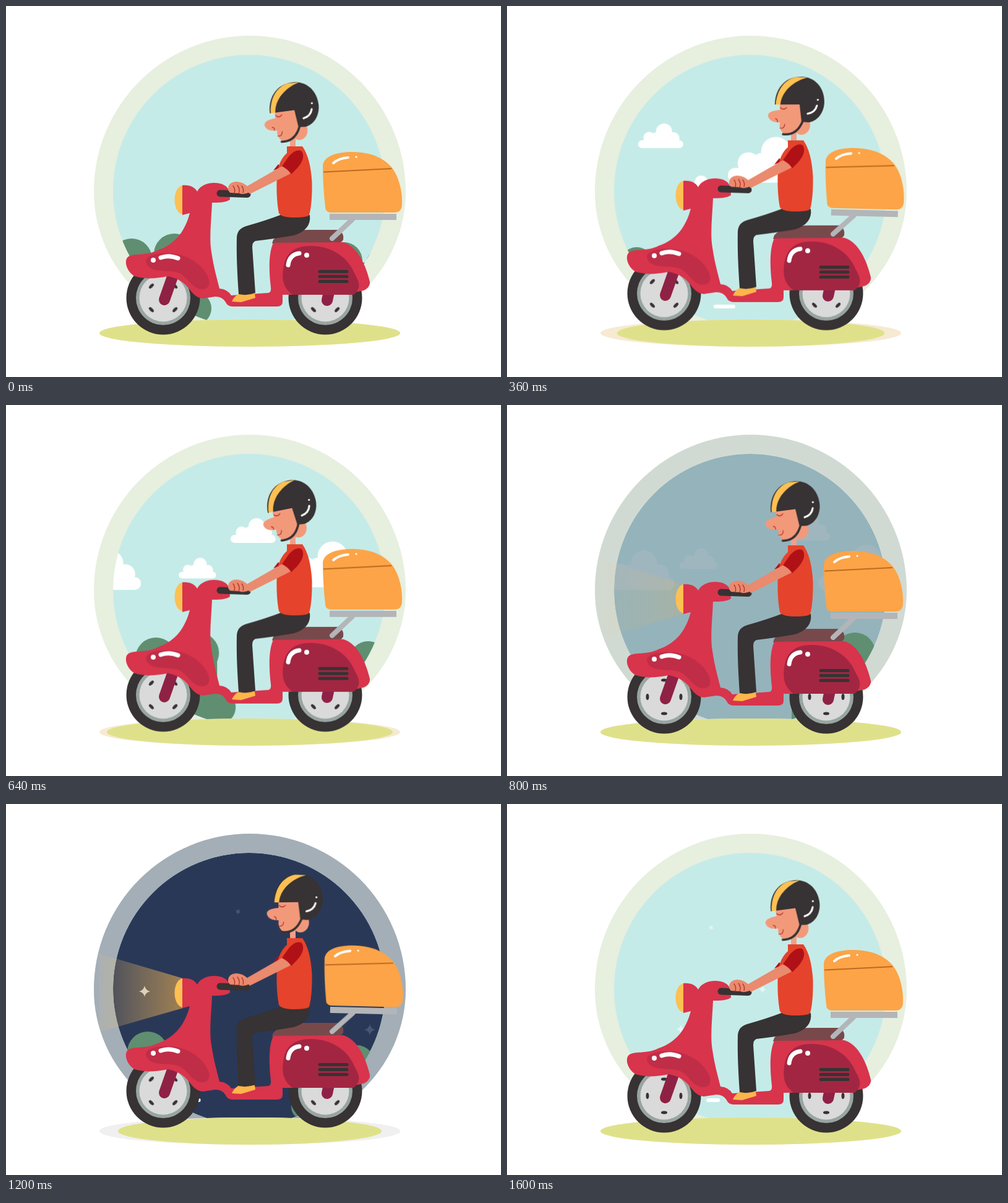
An HTML page without scripts that plays this animation: 800 by 600 pixels, repeating every 1640 ms.

```html
<!DOCTYPE html>
<html lang="en">
<head>
<meta charset="utf-8">
<title>Scooter delivery</title>
<style>
  html, body { margin: 0; width: 100%; height: 100%; overflow: hidden; background: #fff; }
  svg { display: block; width: 100vw; height: 100vh; }
  .anim { animation: 1640ms linear infinite; }

  /* Stepped parts start slightly early so no step lands on a rounding edge */
  .bounce, .ground, .spin, .bushes { animation-delay: -10ms; }

  /* The ride bounces every 800 ms, twice per loop */
  .bounce { animation-name: bounce; animation-timing-function: steps(10); }
  .ground { animation-name: squeeze; animation-timing-function: steps(10); transform-origin: 394px 529px; }
  .rider { animation-name: lift; }
  .head { animation-name: nod; transform-origin: 465px 222px; }
  .cargo { animation-name: tilt; transform-origin: 527px 376px; }
  .spin { animation-name: spin; animation-timing-function: steps(41); }
  @keyframes bounce {
    0%, 48.78%, 97.56%, 100% { transform: translateY(0); }
    24.39%, 73.17% { transform: translateY(-8px); }
  }
  @keyframes squeeze {
    0%, 48.78%, 97.56%, 100% { transform: scaleX(1); }
    24.39%, 73.17% { transform: scaleX(.877); }
  }
  @keyframes lift {
    0%, 48.78%, 97.56%, 100% { transform: translateY(0); }
    9.76%, 58.54% { transform: translateY(-2.8px); }
    17.07%, 65.85% { transform: translateY(-3.2px); }
    24.39%, 73.17% { transform: translateY(-2.2px); }
    39.02%, 87.8% { transform: translateY(1.4px); }
  }
  @keyframes nod {
    0%, 48.78%, 97.56%, 100% { transform: rotate(-7.5deg); }
    9.76%, 58.54% { transform: rotate(-.8deg); }
    17.07%, 65.85% { transform: rotate(1deg); }
    24.39%, 73.17% { transform: rotate(-.7deg); }
    39.02%, 87.8% { transform: rotate(-11.5deg); }
  }
  @keyframes tilt {
    0%, 39.02%, 48.78%, 87.8%, 97.56%, 100% { transform: rotate(0); }
    9.76%, 24.39%, 58.54%, 73.17% { transform: rotate(1.4deg); }
  }
  @keyframes spin { to { transform: rotate(-1845deg); } }

  .night { animation-name: night; }
  @keyframes night {
    0%, 44%, 95.5%, 100% { opacity: 0; }
    59.5%, 84.5% { opacity: 1; }
  }

  .clouds { animation-name: clouds; }
  @keyframes clouds {
    0%, 2% { opacity: 0; }
    15%, 41% { opacity: 1; }
    52%, 100% { opacity: 0; }
  }
  .drift { animation-name: drift; }
  @keyframes drift {
    from { transform: translate(var(--from)); }
    to { transform: translate(var(--to)); }
  }

  .bushes { animation-name: bushes; }
  @keyframes bushes {
    0% { transform: translateX(0); animation-timing-function: steps(7); }
    17.07% { transform: translateX(440px); animation-timing-function: step-end; }
    17.073% { transform: translateX(-526px); animation-timing-function: steps(15); }
    53.65% { transform: translateX(416px); animation-timing-function: step-end; }
    53.658% { transform: translateX(-541px); animation-timing-function: steps(16); }
    92.68%, 100% { transform: translateX(455px); }
  }

  .dash-low { animation-name: dashLow; }
  .dash-high { animation-name: dashHigh; }
  @keyframes dashLow {
    0%, 14.63% { transform: translateX(231px); }
    43.9% { transform: translateX(639px); }
    43.91%, 51.22% { transform: translateX(247px); }
    70.73% { transform: translateX(519px); }
    70.74%, 82.93% { transform: translateX(254px); }
    97.56%, 100% { transform: translateX(458px); }
  }
  @keyframes dashHigh {
    0%, 70.73% { transform: translateX(231px); }
    73.17% { transform: translateX(291px); }
    82.93% { transform: translateX(531px); }
    82.94%, 92.68% { transform: translateX(231px); }
    97.56% { transform: translateX(321px); }
    100% { transform: translateX(365px); }
  }

  .stars use { opacity: 0; animation: twinkle 1640ms linear infinite; animation-delay: calc((var(--peak) - 1710) * 1ms); }
  @keyframes twinkle {
    0%, 8.6%, 100% { opacity: 0; }
    4.3% { opacity: 1; }
  }

  .red { fill: #d8344c; }
  .maroon { fill: #a22642; }
  .dark { fill: #373233; }
  .skin { fill: #ea8a6e; }
  .face { fill: #f2997a; }
  .yellow { fill: #fdb64a; }
  .light { fill: #fdc052; }
  .grey { fill: #b3b5b8; }
  .shine { fill: none; stroke: #fff; stroke-linecap: round; }
  .ink { fill: none; stroke: #b5322c; stroke-width: 1.3; stroke-linecap: round; }
</style>
</head>
<body>
<svg viewBox="0 0 800 600" preserveAspectRatio="none">
  <defs>
    <path id="disc" d="M142 300A252 252 0 0 1 646 300A252 235 0 0 1 142 300Z"/>
    <clipPath id="skyClip"><circle cx="393" cy="299" r="220"/></clipPath>
    <clipPath id="discClip"><use href="#disc"/></clipPath>
    <linearGradient id="beam">
      <stop offset="0" stop-color="#f6c682" stop-opacity=".1"/>
      <stop offset=".25" stop-color="#f6c268" stop-opacity=".23"/>
      <stop offset="1" stop-color="#f2b04c" stop-opacity=".6"/>
    </linearGradient>
    <g id="cloud" fill="#fff">
      <rect y="27" width="73" height="13" rx="6.5"/>
      <path d="M18 22H57V34H18Z"/>
      <circle cx="18" cy="23" r="9.5"/><circle cx="30" cy="24" r="10"/>
      <circle cx="42" cy="13" r="13"/><circle cx="57" cy="24" r="10"/>
    </g>
    <path id="star" d="M0-9Q1.5-1.5 9 0Q1.5 1.5 0 9Q-1.5 1.5-9 0Q-1.5-1.5 0-9Z"/>
    <g id="holes" class="dark">
      <ellipse cx="-27" rx="2.5" ry="5"/><ellipse cx="27" rx="2.5" ry="5"/>
      <ellipse cy="-27" rx="5" ry="2.5"/><ellipse cy="27" rx="5" ry="2.5"/>
    </g>
    <g id="wheel">
      <circle r="59.5" class="dark"/>
      <circle r="44" fill="#98a5a1"/>
      <circle r="38.5" fill="#dadada"/>
      <g class="anim spin"><use href="#holes"/></g>
    </g>
  </defs>

  <!-- Backdrop -->
  <use href="#disc" fill="#e7efdf"/>
  <use href="#disc" class="anim night" fill="#a3aeb7"/>
  <circle cx="393" cy="299" r="220" fill="#c5ebe8"/>
  <g clip-path="url(#skyClip)">
    <g class="anim clouds">
      <g class="anim drift" style="--from:17px,199px;--to:902px,158px"><use href="#cloud"/></g>
      <g class="anim drift" style="--from:237px,200px;--to:782px,253px"><use href="#cloud" transform="scale(1.85)"/></g>
      <g class="anim drift" style="--from:279px,309px;--to:279px,151px"><use href="#cloud" transform="scale(.83)"/></g>
      <g class="anim drift" style="--from:-110px,235px;--to:431px,235px"><use href="#cloud" transform="scale(1.6)"/></g>
    </g>
    <circle class="anim night" cx="393" cy="299" r="220" fill="#2a3858"/>
    <g class="anim bushes" fill="#5f8f70">
      <circle cx="203" cy="409" r="33"/><circle cx="272" cy="401" r="33"/>
      <path d="M170 409H302V508H170Z"/><circle cx="305" cy="489" r="27"/>
      <circle cx="546" cy="412" r="30"/><circle cx="610" cy="418" r="28"/>
      <path d="M525 415H634V508H525Z"/><circle cx="525" cy="490" r="21"/>
    </g>
  </g>
  <ellipse cx="394" cy="529" rx="243" ry="22" fill="#f6ead2"/>
  <ellipse class="anim night" cx="394" cy="529" rx="243" ry="22" fill="#f0f0f0"/>
  <ellipse class="anim ground" cx="394" cy="529" rx="243" ry="22" fill="#dfe18a"/>
  <rect class="anim dash-low" y="483" width="35" height="6" rx="3" fill="#fff"/>
  <rect class="anim dash-high" y="476" width="22" height="6" rx="3" fill="#fff"/>

  <g clip-path="url(#discClip)">
    <g class="anim night"><path class="anim bounce" d="M286 290L150 250V377L286 338Z" fill="url(#beam)"/></g>
  </g>

  <g class="stars" fill="#d5e2e6">
    <use href="#star" transform="translate(393 174) rotate(30) scale(.6)" style="--peak:960"/>
    <use href="#star" transform="translate(258 295) rotate(25) scale(.8)" fill="#e6d9b8" style="--peak:960"/>
    <use href="#star" transform="translate(193 366)" style="--peak:960"/>
    <use href="#star" transform="translate(224 303)" fill="#dfd3b5" style="--peak:1200"/>
    <use href="#star" transform="translate(563 174) rotate(30) scale(.55)" style="--peak:1440"/>
    <g fill-opacity=".18">
      <use href="#star" transform="translate(375 174) rotate(30) scale(.55)" style="--peak:1200"/>
      <use href="#star" transform="translate(588 365)" style="--peak:1200"/>
      <use href="#star" transform="translate(356 174) scale(.45)" style="--peak:1440"/>
      <use href="#star" transform="translate(204 200) scale(.45)" style="--peak:1440"/>
      <use href="#star" transform="translate(413 303)" style="--peak:1440"/>
      <use href="#star" transform="translate(364 366)" style="--peak:1440"/>
      <use href="#star" transform="translate(570 366)" style="--peak:1440"/>
    </g>
    <g fill="#fff">
      <use href="#star" transform="translate(330 200) rotate(30) scale(.5)" style="--peak:1569"/>
      <use href="#star" transform="translate(413 300) scale(.7)" style="--peak:1569"/>
      <use href="#star" transform="translate(281 364) scale(.8)" style="--peak:1569"/>
    </g>
  </g>

  <g class="anim bounce">
    <!-- Scooter -->
    <use href="#wheel" x="254" y="472"/>
    <use href="#wheel" x="516" y="472"/>
    <path d="M269 438L256 475M522 462L519 476" fill="none" stroke="#8f2145" stroke-width="18" stroke-linecap="round"/>
    <path d="M430 384L432 378Q445 362 490 362L538 362Q547 368 545 378Q542 384 532 384Z" fill="#78494b"/>
    <path class="light" d="M286 290C268 292 268 335 286 337Z"/>
    <path class="red" d="M285 290C297 289 305 293 309 300C314 290 326 286 336 286C350 286 358 291 361 300L362 313C355 318 343 318 333 318C332 345 328 375 332 398C336 425 341 440 345 457Q358 458 364 468L424 464Q429 463 428 455C425 430 424 400 432 383L545 382C568 388 582 420 588 446Q589 455 578 460L545 467H447V478Q447 486 438 486H366Q358 486 355 479Q350 470 338 470L318 473C295 470 300 445 262 437C240 441 225 442 208 437C195 430 190 412 197 406C205 399 225 405 245 395C275 385 290 362 297 335L285 338Z"/>
    <path d="M226 413C228 402 245 399 268 400C298 403 322 422 328 443Q330 457 318 458C300 458 296 440 280 432C262 425 230 434 226 413Z" fill="#c02d47"/>
    <path class="maroon" d="M463 467C447 455 446 440 448 425C451 400 466 388 492 388C525 388 552 405 563 432C570 445 576 455 562 467Z"/>
    <path class="shine" d="M250 407Q263 402 278 408M456 419Q458 402 474 400" stroke-width="7"/>
    <g fill="#fff"><circle cx="238" cy="411" r="4"/><circle cx="486" cy="403" r="4"/></g>
    <path d="M507 429.5H551M507 437.5H551M507 445.5H551" stroke="#373233" stroke-width="5" stroke-linecap="round"/>

    <g class="anim cargo">
      <path d="M527 376L560 345" stroke="#b3b5b8" stroke-width="8" stroke-linecap="round"/>
      <rect class="grey" x="523" y="336" width="108" height="10"/>
      <path d="M512 258C514 242 535 236 560 236C595 236 615 250 625 263C637 280 641 305 640 322Q639 334 628 334H524Q516 333 516 325Q512 290 512 258Z" fill="#fca447"/>
      <path d="M513 268.5L623 263" stroke="#bd6a22" stroke-width="2"/>
      <path class="shine" d="M529 254Q538 246 553 245" stroke-width="4"/>
      <circle cx="566" cy="244" r="1.6" fill="#fff"/>
    </g>
    <path d="M346 303L390 304.5" stroke="#373233" stroke-width="11" stroke-linecap="round"/>

    <!-- Rider -->
    <g class="anim rider">
      <path class="yellow" d="M365 478Q368 470 377 465H402L403 472Q390 476 380 479Z"/>
      <path class="dark" d="M491 338Q494 362 465 371Q430 377 403 380Q398 382 398 390L403 464Q390 469 376 466Q372 410 373 374Q374 360 388 356Q420 347 446 337Z"/>
      <rect x="459" y="212" width="9" height="18" fill="#f0a088"/>
      <path d="M432 266L440 256L445 261Z" fill="#b01117"/>
      <path d="M454 227H479Q492 245 494.5 285Q495 320 490 338Q487 342 465 342Q445 342 441 335Q436 310 438 270Q442 248 454 238Z" fill="#e5432b"/>
      <path class="skin" d="M446 259L462 270L394 304L385 294Z"/>
      <path d="M458 242Q470 230 478 235Q485 246 470 263L461 272Q454 262 446 259Z" fill="#b01117"/>
      <path class="skin" d="M359 298Q358 285 372 284Q384 284 392 294L394 301Q384 306 377 303L362 302Z"/>
      <path class="ink" d="M367 291Q371 296 369 302M374 290Q379 296 376 303M381 291Q385 296 383 302"/>

      <g class="anim head">
        <ellipse class="face" cx="476" cy="202" rx="14" ry="16"/>
        <path class="face" d="M441 167H474L480 198Q470 216 455 218L446 215Q439 208 441 198Q424 198 422 187Q422 179 441 178Z"/>
        <path class="ink" d="M442 174Q447 179 452 174M441 207Q448 209 449 201M434 192Q438 193 437 197"/>
        <path d="M478 196Q468 220 446 217" fill="none" stroke="#373233" stroke-width="3.5" stroke-linecap="round"/>
        <path class="dark" d="M433 169C434 140 452 124 475 124C498 124 513 142 513 164C513 184 500 197 487 198L476 197L473 169Z"/>
        <path class="light" d="M434.500 169C436 148 447 128 469 124.500L486 125.500C463 131 444 148 442 169Z"/>
        <path class="shine" d="M486 184Q498 182 501 171" stroke-width="3"/>
        <circle cx="502.500" cy="161.500" r="1.6" fill="#fff"/>
      </g>
    </g>
  </g>
</svg>
</body>
</html>
```
